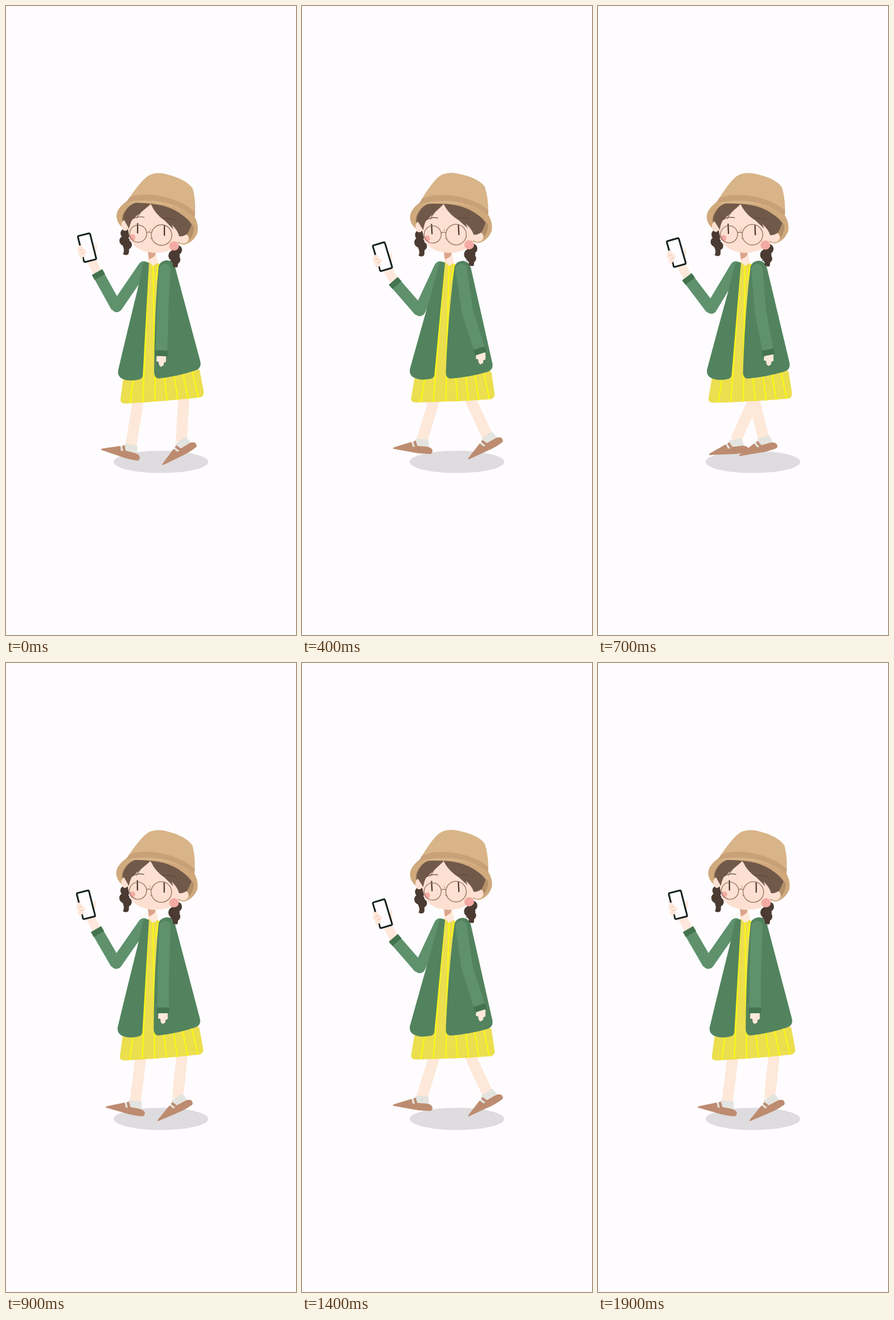
Recreate the animation shown at these times as an HTML page. Size 509 by 1101 pixels, loop 2000 ms.

```html
<!DOCTYPE html>
<html lang="en">
<head>
<meta charset="utf-8">
<title>Walking girl</title>
<style>
  html, body { margin: 0; height: 100%; overflow: hidden; background: #fefcff; }
  svg { display: block; width: 100vw; height: 100vh; }
  .coat { fill: #52835e; }
  .sleeve { stroke: #5f916d; stroke-width: 20; fill: none; }
  .cuff { stroke: #43744f; stroke-width: 21; }
  .round { stroke-linecap: round; }
  .skin { fill: #fde0d1; }
  .pale { fill: #fee8db; }
  .leg { stroke: #fde8d9; stroke-width: 19.5; }
  .hair { fill: #71594a; }
  .braid { fill: #4b3b32; }
  .stripes { stroke: #fbfb0c; stroke-width: 2; fill: none; }
  .frames { stroke: #93705f; stroke-width: 1.3; fill: none; }
  .eyes { stroke: #46352d; stroke-width: 2.2; }
  .blush { fill: #f4aaa4; }
</style>
</head>
<body>
<svg viewBox="0 0 509 1101">
  <defs>
    <g id="foot">
      <path fill="#e3e4e0" d="M38-20 60-21 63-6 34-4 31-13 38-14Z"/>
      <path fill="#bd8c70" d="M0 1Q-1-1 2-2L31-14 34-6H38L34-15 38-17 42-8H58Q66-8 69-3 70 3 66 4 50 6 35 4Z"/>
    </g>
  </defs>
  <ellipse cx="272" cy="798" rx="83" ry="19.5" fill="#dedcdf"/>

  <g id="legA"><line class="leg"/><use href="#foot"/></g>
  <g id="legB"><line class="leg"/><use href="#foot"/></g>

  <g id="upperFar">
    <g id="foreFar">
      <g id="phoneHand">
        <g transform="translate(-161 -470)">
          <path class="pale" d="M156 417Q160 414 158 427L156 441 167 465 153 471 140 446Z"/>
          <rect x="-11" y="-23.5" width="22" height="47" rx="2" transform="translate(141 423) rotate(-14)"
                fill="#fefcff" stroke="#14211d" stroke-width="3"/>
          <path class="pale" d="M125 421Q131 416 135 424L140 429Q142 432 137 433L138 438 133 440 134 446 126 437 128 435 124 430Z"/>
          <path d="M128 428 133 426M131 434 136 432" stroke="#eab9a4" fill="none"/>
        </g>
      </g>
      <path class="sleeve" d="M0 0V-62"/>
      <path class="cuff" d="M0-60V-70"/>
    </g>
    <path class="sleeve round" d="M0 2V86"/>
  </g>

  <g id="body">
    <path fill="#ebde4f" d="M250 447 269 451 290 600 340 638 347 675Q348 683 341 685 280 692 209 696 200 696 201 688L206 650 240 600Z"/>
    <path class="stripes" d="M224 650 218 695M250 460 240 694M258 452 262 692M277 645 283 691M294 640 302 690M310 640 320 688M326 636 338 685M268 452 263 480"/>
    <path class="coat" d="M241 451Q246 446 251 450L240 647Q239 653 232 654 215 658 203 652 195 647 197 637 214 565 230 500Z"/>
    <path class="coat" d="M268 455Q271 446 283 445 294 446 297 458L341 622Q344 634 332 638 302 648 268 652 260 651 260 641 260 540 268 455Z"/>
  </g>
  <path class="pale" d="M249 430H263L267 449 258 455 250 447Z"/>
  <path fill="#dca58b" d="M249 430H263L261 438 251 444Z"/>

  <g id="upperNear">
    <path class="sleeve round" d="M0 2V76"/>
    <g id="foreNear">
      <g id="nearHand">
        <path class="pale" d="M-8-2H8V10L4 12V16L-1 19-4 16-5 10-9 9Z"/>
      </g>
      <path class="sleeve" d="M0 0V70"/>
      <path class="cuff" d="M0 68V78"/>
    </g>
  </g>

  <g id="head">
    <g class="braid">
      <circle cx="210" cy="398" r="9"/><circle cx="208" cy="411" r="9"/><circle cx="213" cy="418" r="8"/>
      <path d="M205 419Q209 430 205 434 211 438 215 434 217 428 215 420Z"/>
      <circle cx="300" cy="427" r="9"/><circle cx="295" cy="437" r="10"/><circle cx="298" cy="444" r="8"/>
      <path d="M287 446Q295 449 292 455 297 459 301 457 303 450 301 444Z"/>
    </g>
    <path fill="#d0a97c" d="M213 341Q195 353 194 366 193 378 205 389L312 418Q329 414 336 397 339 382 330 367 295 330 213 341Z"/>
    <path fill="#b39069" d="M206 386Q198 364 215 353 250 341 292 357 326 374 330 388 328 410 310 416Z"/>
    <path class="hair" d="M205 380Q203 358 222 350 260 341 300 361 322 372 325 384 321 398 313 403L220 392Z"/>
    <ellipse class="skin" cx="209" cy="384" rx="6.5" ry="9.5"/>
    <ellipse class="skin" cx="311" cy="407" rx="10" ry="9"/>
    <path class="skin" d="M214 380 254 347 294 380 306 398Q306 411 300 418 288 433 258 432 224 429 217 405 213 392 214 380Z"/>
    <path class="hair" d="M254 346Q237 357 229 374 231 366 236 361 220 368 216 390L207 374Q206 352 228 344Z"/>
    <path class="hair" d="M254 346Q262 365 279 376L294 391 291 383Q301 392 304 403 311 404 318 399L326 383Q302 350 254 346Z"/>
    <path d="M222 373Q230 367 243 370M277 372Q289 371 298 375" stroke="#5d473b" stroke-width="1.2" fill="none"/>
    <ellipse class="blush" cx="222" cy="405" rx="5" ry="5.5"/>
    <ellipse class="blush" cx="295" cy="420" rx="8.5" ry="8"/>
    <path class="eyes" d="M231 380V398M278 384V402"/>
    <g class="frames">
      <circle cx="232" cy="398.5" r="15"/><circle cx="273" cy="401" r="18"/>
      <path d="M247 397Q251 394 255 397"/>
      <path d="M253 390V393M253 406Q255 408 257 407" stroke-width=".8"/>
    </g>
    <path fill="#d8b488" d="M210 345Q236 306 250 297 262 290 280 294 317 303 328 320 334 343 331 371 300 340 210 345Z"/>
    <path fill="#c8a179" d="M217 335Q233 327 268 332 310 340 332 361L331 370Q304 348 268 342 232 338 210 345Z"/>
  </g>
</svg>
<script>
const $ = id => document.getElementById(id);
const STEP = 100, PERIOD = 1000;
const KNOTS = [0, .39, .61, .93, 1];
const legs = {
  legA: { hip: [232, 258, 274, 296, 301], x: [167, 214, 248, 292, 301], y: [776, 783, 787, 793, 794], tilt: [14, -47] },
  legB: { hip: [312, 293, 273, 232, 224], x: [275, 227, 195, 160, 152], y: [803, 793, 785, 774, 771], tilt: [-31, 39] }
};

const along = (values, s) => {
  let i = 0;
  while (i < 3 && s > KNOTS[i + 1]) i++;
  return values[i] + (values[i + 1] - values[i]) * (s - KNOTS[i]) / (KNOTS[i + 1] - KNOTS[i]);
};
const place = (el, x, y, angle) => el.setAttribute('transform', `translate(${x} ${y}) rotate(${angle})`);
const spin = (id, angle, x, y, dx = 0) => $(id).setAttribute('transform', `translate(${dx} 0) rotate(${angle} ${x} ${y})`);

function drawLeg(id, s) {
  const leg = legs[id], [line, foot] = $(id).children;
  const x = along(leg.x, s), y = along(leg.y, s), hip = along(leg.hip, s);
  const tilt = leg.tilt[0] + leg.tilt[1] * s, a = tilt * Math.PI / 180;
  place(foot, x, y, tilt);
  const ax = x + 49 * Math.cos(a) + 18 * Math.sin(a);
  const ay = y + 49 * Math.sin(a) - 18 * Math.cos(a);
  // Continue the shin upwards beneath the dress.
  const points = { x1: hip + (hip - ax) * .4, y1: 690 + (690 - ay) * .4, x2: ax, y2: ay };
  for (const key in points) line.setAttribute(key, points[key]);
}

function draw(now) {
  const p = Math.floor(now / STEP) * STEP % PERIOD / PERIOD;
  const swing = peak => (1 + Math.cos(2 * Math.PI * (p - peak))) / 2;
  const s = swing(.5), stride = swing(.485);

  drawLeg('legA', stride);
  drawLeg('legB', stride);
  spin('body', 2.5 * s, 257, 450);
  spin('head', -3.5 * s, 257, 436, -.7 * s);

  const upper = 35 - 10 * swing(.42), fore = 29.1 + 13 * swing(.49);
  place($('upperFar'), 243, 455, upper);
  place($('foreFar'), 0, 87, -fore - upper);
  place($('phoneHand'), 0, -65, fore - 3 * s);

  const upperNear = -3 + 12.3 * stride, foreNear = -1.7 + 21 * stride;
  place($('upperNear'), 279, 459, -upperNear);
  place($('foreNear'), 0, 76, upperNear - foreNear);
  place($('nearHand'), 0, 78, foreNear);
  requestAnimationFrame(draw);
}
draw(performance.now());
</script>
</body>
</html>
```
